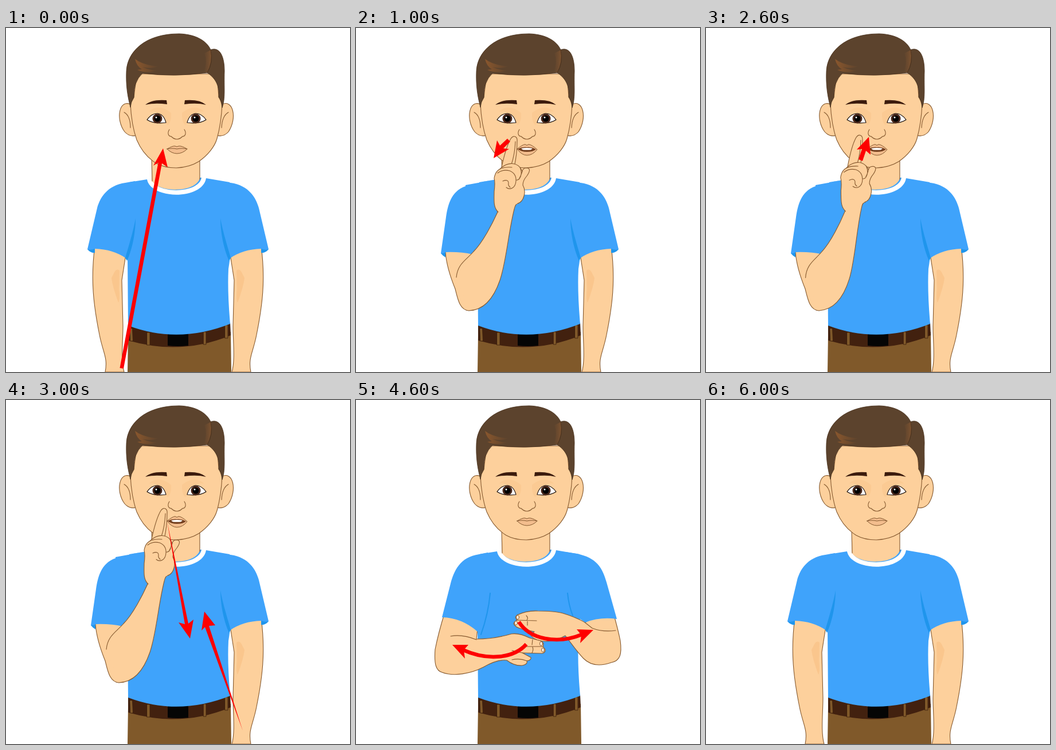
Animation of 600 by 600 pixels, one loop 7 s. Source, as an HTML page without scripts:

```html
<!DOCTYPE html>
<html lang="en">
<head>
<meta charset="utf-8">
<title>Signing boy</title>
<style>
  html, body { margin: 0; width: 100%; height: 100%; overflow: hidden; background: #fff; }
  svg { display: block; width: 100vw; height: 100vh; }
  path, ellipse { stroke-linejoin: round; stroke-linecap: round; }
  .skin { fill: #fdd09c; stroke: #85592f; stroke-width: 1.1; }
  .line { fill: none; stroke: #85592f; stroke-width: 1.1; }
  .plain { stroke: none; }
  .shade { fill: #fac68d; }
  .shirt { fill: #3fa3fb; }
  .fold { fill: #1f95ec; }
  .crease { fill: none; stroke: #1f95ec; stroke-width: 2; }
  .belt { fill: #42210f; }
  .loop { fill: #80592a; stroke: #3a1d0c; stroke-width: .8; }
  .lip { fill: #f3bd8d; stroke: #85592f; stroke-width: 1; }
  .nail { fill: #fff0df; stroke: #85592f; stroke-width: 1; }
  .arrow { fill: #fe0000; }
  .sweep { fill: none; stroke: #fe0000; stroke-width: 6.5; stroke-linecap: butt; }
  .pose { visibility: hidden; animation: show 7s step-end infinite; animation-delay: calc((var(--n) - 7) * 1s); }
  @keyframes show { 0% { visibility: visible; } 14.28571%, 100% { visibility: hidden; } }
</style>
</head>
<body>
<svg viewBox="0 0 600 600">
  <defs>
    <linearGradient id="shine">
      <stop offset="0" stop-color="#8a572d"/>
      <stop offset="1" stop-color="#5c432d"/>
    </linearGradient>
    <linearGradient id="shineSide" x1="1" x2="0">
      <stop offset="0" stop-color="#7c5230"/>
      <stop offset="1" stop-color="#5c432d"/>
    </linearGradient>

    <g id="closedMouth">
      <path class="lip" d="M281 211Q291 205 295 206Q298 208 301 206Q306 205 316 211Q308 219 298 219Q289 219 281 211Z"/>
      <path class="line" d="M281 211Q290 209 298 211Q307 209 316 211"/>
    </g>
    <g id="openMouth">
      <path class="lip" d="M281 211Q291 203 295 203Q298 206 301 203Q306 203 316 212Q308 222 298 222Q289 222 281 211Z"/>
      <path fill="#74401f" d="M282 211Q290 207 298 208Q306 207 314 211.500Q309 216 298 216Q288 216 282 211Z"/>
      <path fill="#fff" d="M288 210Q298 208 308 210L305 212.500Q298 213 291 212.500Z"/>
    </g>

    <!-- Arms hanging at the sides -->
    <g id="armDown">
      <path class="skin" d="M445 380C453 440 447 485 437 535C431 566 422 575 427 600L394 600C400 580 396 545 396 520L398 440L391 395Z"/>
      <path class="shade" d="M402 423Q407 419 411 426L416 436Q414 452 404 479Q401 474 403 455Z"/>
    </g>
    <g id="sleeveDown">
      <path class="fold" d="M458 386Q452 393 445 392L445 382Z"/>
      <path class="shirt" d="M375 267L392 270C424 275 436 296 441 314L458 386Q452 388 445 385Q413 386 390 402L375 390Z"/>
      <path class="fold" d="M374 332C377 350 383 370 392 401L389 406C379 384 374 355 374 332Z"/>
    </g>
    <g id="sideDown"><use href="#armDown"/><use href="#sleeveDown"/></g>
    <g id="idle">
      <use href="#sideDown"/>
      <use href="#sideDown" transform="matrix(-1 0 0 1 600 0)"/>
      <use href="#closedMouth"/>
    </g>

    <!-- Hand raised to the face -->
    <g id="raisedBase">
      <use href="#sideDown"/>
      <use href="#openMouth"/>
      <path class="skin plain" d="M156 388L206 388L222 450L197 493C180 492 177 470 173 455Q157 418 156 388Z"/>
      <path class="line" d="M156 391Q158 418 173 455C177 470 180 492 197 493"/>
      <path class="fold" d="M148 393Q152 398 156 400V389Z"/>
      <path class="shirt" d="M246 264L191 274V276C165 285 160 310 157 330L148 393Q152 394 156 391Q182 390 204 395L222 390V268Z"/>
    </g>
    <g id="raisedArm">
      <path class="skin" d="M197 493C226 492 242 466 251 440C262 408 266 355 276 316Q278 306 283 306L264 290L242 300L247 321C238 341 221 374 205 390C193 404 177 411 175 435"/>
      <path class="skin" d="M253 247C258 223 264 203 270 193C275 186 282 189 281 198Q281 220 276 242Z"/>
      <path class="line" d="M278 198Q277 220 271 238"/>
      <path class="skin" d="M248 321C239 313 241 300 241 285Q243 270 241 262Q243 250 251 246C262 235 277 233 286 243L290 250Q291 244 298 244C305 245 303 251 298 258Q291 266 291 274Q296 283 293 293Q290 304 282 306"/>
      <path class="line" d="M247 253Q256 246 268 249Q280 254 279 267C278 280 268 283 262 278M251 246Q258 242 272 243M256 267Q266 263 266 271Q265 275 269 278M286 243Q291 254 285 263Q282 266 279 265M290 250Q288 257 285 262"/>
    </g>

    <!-- Fist held in front of the shoulder -->
    <g id="sideFist">
      <path class="skin" d="M214 395Q212 455 198 496L180 440V390Z"/>
      <path class="shirt" d="M232 267L222 268L196 276C167 285 158 308 153 330L140 387L150 389L190 386L216 407L232 400Z"/>
      <path class="fold" d="M140 382V388L150 398V380ZM221 279Q222 330 222 380L217 408L205 399L211 376Q219 330 221 279ZM207 320Q210 345 217 370L213 382Q208 350 207 320Z"/>
      <path class="skin" d="M150 403C152 435 132 445 134 485C136 515 151 532 167 532C184 531 198 505 198 488C198 463 184 449 186 405Z"/>
      <path class="skin" d="M145 356Q157 353 169 355Q181 351 189 353C198 353 201 361 200 370Q199 377 195 382V391Q195 403 187 409C177 415 157 413 151 405Q147 397 149 382C141 384 134 381 135 375Q135 369 142 369C137 365 138 357 145 356Z"/>
      <path class="line" d="M141 369Q156 368 166 371M149 382Q160 379 170 382Q181 382 186 376M152 357Q155 362 153 367M169 355Q163 363 167 372M148 371Q151 376 149 381M149 395Q159 402 169 399Q184 404 194 389M169 383Q173 391 169 399M186 378Q182 388 192 390"/>
      <ellipse class="nail" cx="191" cy="379" rx="2" ry="5" transform="rotate(-42 191 379)"/>
    </g>
  </defs>

  <!-- Trousers and belt -->
  <path fill="#80592a" d="M213 535Q300 562 392 530L393 600H212Z"/>
  <path class="belt" d="M213 516Q300 549 391 514L392 536Q305 572 213 545Z"/>
  <path fill="#050505" d="M282 533H318V554Q299 556 282 554Z"/>
  <path class="loop" d="M216 524h4.500l1 22h-4.500zM246 531h5v22h-5zM344.500 530h4.500v22h-4.500zM382 518h5v23h-5z"/>

  <!-- Torso and neck -->
  <path class="shirt" d="M246 264L215 269L212 400L213 519Q300 552 391 516Q386 460 388 420L391 400L390 269L349 262Z"/>
  <path fill="#fff" d="M246 264C253 300 343 300 349 262L339 261L255 263Z"/>
  <path class="shirt" d="M254 262C258 290 336 290 341 261Z"/>
  <path class="skin plain" d="M254 220V265C263 288 331 288 338 262V215Z"/>
  <path class="line" d="M254 226L255 267M338 225V264"/>

  <!-- Head -->
  <path class="skin" d="M219 134C198 122 190 158 207 181Q216 191 228 187ZM375 134C396 122 404 157 388 181Q379 191 367 187Z"/>
  <path class="line" d="M206 147Q217 153 217 174M388 147Q377 153 376 174"/>
  <path class="skin" d="M217 132C218 155 221 175 228 195C236 214 249 228 262 236Q276 244 297 244Q320 243 336 233C352 222 364 207 368 193C373 175 376 155 377 132L371 120L368 80H228L223 121Z"/>
  <path fill="#5c432d" stroke="#442c18" stroke-width=".8" d="M217 138C212 119 209 100 210 76C211 42 242 10 302 10C333 11 351 24 357 38C373 32 381 50 381 75C380 105 383 122 377 139Q375 124 371 121C373 98 363 86 351 78Q295 86 238 79Q222 94 223 121Q218 128 217 138Z"/>
  <path fill="url(#shine)" d="M225 54Q239 65 266 67Q253 72 238 68Q250 74 264 74Q244 80 229 73L237 72Q228 67 225 54Z"/>
  <path fill="url(#shineSide)" d="M358 38Q360 60 351 78L345 76Q352 58 346 44Z"/>
  <path fill="none" stroke="#442c18" stroke-width=".8" d="M357 38Q362 60 351 78"/>
  <path id="brow" fill="#3b1b0d" d="M243 134Q254 124 280 126L281 133Q259 130 243 134Z"/>
  <use href="#brow" transform="matrix(-1 0 0 1 592 0)"/>
  <g id="eye">
    <path class="shade" opacity=".55" d="M249 146Q266 130 288 148Q289 164 282 170L279 165Q268 142 249 146Z"/>
    <path fill="#fff" stroke="#170b06" stroke-width="1.200" d="M246 160Q254 149 264 149Q275 150 279 165Q258 168 246 160Z"/>
    <circle cx="264" cy="158" r="8.500" fill="#4b281b"/>
    <circle cx="264" cy="158" r="5.500"/>
  </g>
  <use href="#eye" transform="matrix(-1 0 0 1 595 0)"/>
  <circle cx="262" cy="156" r="1.500" fill="#fff"/>
  <circle cx="329" cy="156" r="1.500" fill="#fff"/>
  <path class="line" d="M285 177C281 183 283 189 288 189Q298 199 308 189C313 189 315 183 311 177"/>

  <!-- Poses -->
  <g class="pose" style="--n:0">
    <use href="#idle"/>
    <path class="arrow" d="M274 210L282 243L272 236L205 594L198.500 593L265.500 235L257 240Z"/>
  </g>
  <g class="pose" style="--n:1">
    <use href="#raisedBase"/><use href="#raisedArm"/>
    <path class="arrow" d="M240 227L246 196L251 205L264 193L269 198L257 210L267 211Z"/>
  </g>
  <g class="pose" style="--n:2">
    <use href="#raisedBase"/><use href="#raisedArm" transform="rotate(-1.600 195 485)"/>
    <path class="arrow" d="M284 190L263 212L272 211L266 229L273 232L279 214L287 221Z"/>
  </g>
  <g class="pose" style="--n:3">
    <use href="#raisedBase"/><use href="#raisedArm"/>
    <path class="arrow" d="M281 212L318 390L327 383L321 416L301 388L312 391ZM413 577L347 396L341 402L346 369L365 393L354 394Z"/>
  </g>
  <g class="pose" style="--n:4">
    <use href="#closedMouth"/>
    <path class="skin" d="M449 372Q457 400 461 420C464 443 461 455 445 458C425 465 409 463 397 451C386 440 376 425 365 411Q350 420 330 421Q313 420 305 411L311 404L288 399Q277 396 275 390Q276 386 281 384Q276 379 281 375Q298 367 317 368Q346 368 361 372Q381 378 400 388L420 372Z"/>
    <path class="line" d="M398 387L412 398Q430 405 453 402M281 384L315 385M297 376Q301 380 298 384M299 386V393"/>
    <path class="skin" d="M155 370Q144 405 138 435C136 462 140 472 150 475C171 483 201 477 222 466Q246 452 263 454Q276 464 290 463Q300 461 298 455Q306 454 305 449L290 441L325 442Q331 440 330 435L326 430Q329 423 322 420L303 415Q285 406 271 408Q240 417 210 417L213 390Z"/>
    <path class="line" d="M165 412Q185 408 210 418M294 430L326 430M290 441L272 437M308 431Q310 436 307 441M308 418L307 427M272 453Q286 450 298 455"/>
    <ellipse class="nail" cx="282" cy="379" rx="2.500" ry="3.500"/>
    <ellipse class="nail" cx="279" cy="389" rx="2.500" ry="3.500"/>
    <ellipse class="nail" cx="323" cy="425" rx="2.500" ry="3.500"/>
    <ellipse class="nail" cx="326" cy="436" rx="2.500" ry="3.500"/>
    <path class="shirt" d="M230 266L215 269C181 274 171 298 165 320L150 379Q185 380 212 404L230 390Z"/>
    <path class="crease" d="M234 337Q231 372 218 409"/>
    <path class="shirt" d="M365 265L385 268C420 275 430 293 437 318L455 382Q425 378 400 388Q380 374 365 371Z"/>
    <path class="crease" d="M369 337Q371 358 378 376"/>
    <path class="sweep" d="M297 426C275 451 229 455 187 436M284 387C303 417 350 427 394 409"/>
    <path class="arrow" d="M168 427L196 427L188 436L190 451ZM414 401L385 400L393 410L391 424Z"/>
  </g>
  <g class="pose" style="--n:5">
    <use href="#openMouth"/>
    <use href="#sideFist"/>
    <use href="#sideFist" transform="matrix(-1 0 0 1 607 0)"/>
  </g>
  <g class="pose" style="--n:6"><use href="#idle"/></g>
</svg>
</body>
</html>
```
